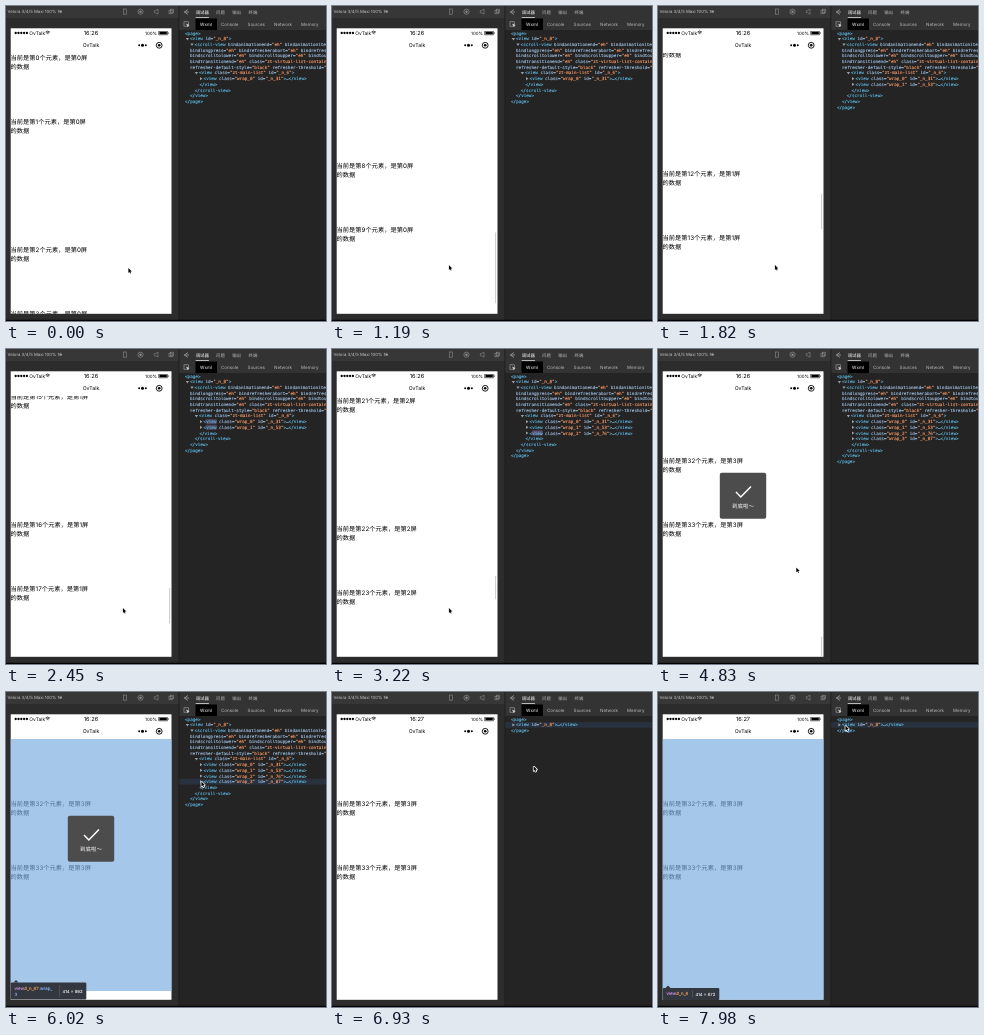
Animation of 320x315 px, one loop 8000 ms. Source, as an HTML page with a canvas:

```html
<!DOCTYPE html>
<html>
<head>
<meta charset="utf-8">
<style>
html, body { margin: 0; width: 100%; height: 100%; overflow: hidden; background: #242424; }
canvas { display: block; width: 320px; height: 315px; }
</style>
</head>
<body>
<canvas id="stage" width="320" height="315"></canvas>
<script>
const c = document.getElementById('stage').getContext('2d');
const LOOP = 8000, STEP = 70, TOP = 47, VIEW = 261;
const SANS = '"Noto Sans CJK SC", "Noto Sans CJK", "Noto Sans", sans-serif';
const MIXED = '"Inter", ' + SANS;
const UI = '"Inter", "Liberation Sans", sans-serif';
const MONO = '"DejaVu Sans Mono", monospace';
const CHAR = 2.575, ROW = 5.68;
const TAG = '#5db0d7', ATTR = '#9bbbdc', VALUE = '#f29766';
const OVERLAY = 'rgba(119,170,224,.66)', ICON = '#8c8c8c';

const scrollKeys = [[210, 0], [1190, 659.5], [2450, 1412], [3220, 1983.5], [3990, 2600.5], [4620, 3011.5]];
const cursorKeys = [
  [0, 122, 261.5], [140, 116.5, 258.5], [4690, 116.5, 258.5], [5250, 202, 96], [5600, 196, 90],
  [5810, 197, 91], [5880, 188, 81], [5950, 188, 81], [6020, 195, 89], [6160, 195, 89],
  [6510, 182, 32], [6650, 182, 32], [7000, 206, 84], [7420, 199, 82], [7490, 199, 82], [7840, 187, 33]
];
const wraps = [[0, 31], [1400, 53], [2870, 76], [4130, 87]];
const flashes = [[1400, 1700, 1], [2240, 2660, 0], [2240, 2660, 1], [3080, 3500, 2], [3850, 4130, 1], [4130, 4550, 3]];
const attributes = [
  '<scroll-view bindanimationend="eh" bindanimationiteration',
  'bindlongpress="eh" bindrefresherabort="eh" bindrefresher',
  'bindscrolltolower="eh" bindscrolltoupper="eh" bindtouch',
  'bindtransitionend="eh" class="zt-virtual-list-container"',
  'refresher-default-style="black" refresher-threshold="45"'
];

function at(keys, t) {
  const n = keys.findIndex(k => k[0] > t);
  if (n === 0) return keys[0].slice(1);
  if (n < 0) return keys[keys.length - 1].slice(1);
  const a = keys[n - 1], b = keys[n], f = (t - a[0]) / (b[0] - a[0]);
  return a.slice(1).map((v, i) => v + (b[i + 1] - v) * f);
}

function rect(x, y, w, h, color) {
  c.fillStyle = color;
  c.fillRect(x, y, w, h);
}

function round(x, y, w, h, r, color) {
  c.fillStyle = color;
  c.beginPath();
  c.roundRect(x, y, w, h, r);
  c.fill();
}

function dot(x, y, r, color) {
  c.fillStyle = color;
  c.beginPath();
  c.arc(x, y, r, 0, 7);
  c.fill();
}

function ring(x, y, r, color, width) {
  c.strokeStyle = color;
  c.lineWidth = width;
  c.beginPath();
  c.arc(x, y, r, 0, 7);
  c.stroke();
}

function line(points, color, width) {
  c.strokeStyle = color;
  c.lineWidth = width;
  c.beginPath();
  points.forEach(p => c.lineTo(...p));
  c.stroke();
}

function shape(points, color) {
  c.fillStyle = color;
  c.beginPath();
  points.forEach(p => c.lineTo(...p));
  c.fill();
}

// Set large and scaled down, so small type keeps its true advances.
// Returns the width; weight thickens the strokes.
function text(s, x, y, size, color, font = UI, align = 'left', weight = 0) {
  c.save();
  c.translate(x, y);
  c.scale(.1, .1);
  c.font = size * 10 + 'px ' + font;
  c.textRendering = 'geometricPrecision';
  c.textAlign = align;
  c.textBaseline = 'alphabetic';
  c.fillStyle = c.strokeStyle = color;
  c.lineWidth = weight * 10;
  c.fillText(s, 0, size * 3.6);
  if (weight) c.strokeText(s, 0, size * 3.6);
  const { width } = c.measureText(s);
  c.restore();
  return width / 10;
}

function code(s, x, y) {
  for (const m of s.matchAll(/"[^"]*"?|<\/?[\w-]+|[>…]|[\w-]+|=/g)) {
    const color = m[0][0] === '"' ? VALUE : /[<>]/.test(m[0]) ? TAG : ATTR;
    text(m[0], x + m.index * CHAR, y, CHAR / .602, color, MONO, 'left', .15);
  }
}

function arrow(x, y, open) {
  shape(open ? [[x - 1.6, y - 1], [x + 1.6, y - 1], [x, y + 1.5]]
             : [[x - 1, y - 1.6], [x - 1, y + 1.6], [x + 1.4, y]], '#a0a0a0');
}

function toolbar() {
  rect(0, 0, 173, 315, '#2c2c2c');
  rect(0, 0, 173, 12, '#373737');
  text('Velora 3/4/5 Maxi 100% 16', 1.5, 5.5, 4.3, '#c8c8c8');
  shape([[53.5, 5], [56, 5], [54.75, 6.6]], '#aaa');
  c.strokeStyle = ICON;
  c.lineWidth = .6;
  c.strokeRect(117.4, 3, 3.2, 5.2);
  ring(134.5, 5.7, 2.6, ICON, .7);
  dot(134.5, 5.7, 1.2, ICON);
  line([[152, 3.2], [149.6, 4.6], [148.3, 4.6], [148.3, 6.8], [149.6, 6.8], [152, 8.2], [152, 3.2]], ICON, .6);
  c.strokeRect(163, 4.2, 3.2, 3.6);
  c.strokeRect(164.6, 3.2, 3, 3.6);
}

function phoneBar(t) {
  for (let i = 0; i < 5; i++) dot(9.7 + i * 2.8, 27, 1.15, '#000');
  text('OvTalk', 23.3, 27, 4.9, '#000');
  for (const r of [1, 2.2, 3.4]) {
    c.strokeStyle = '#000';
    c.lineWidth = .7;
    c.beginPath();
    c.arc(41.7, 28.6, r, -2.3, -.84);
    c.stroke();
  }
  text(t < 6720 ? '16:26' : '16:27', 85, 27, 5.7, '#000', UI, 'center');
  text('100%', 151, 27, 4.5, '#000', UI, 'right');
  c.strokeStyle = '#000';
  c.lineWidth = .5;
  c.strokeRect(152.8, 25.3, 8.6, 3.6);
  rect(153.4, 25.9, 7.4, 2.4, '#000');
  rect(161.8, 26.3, .7, 1.6, '#000');
  text('OvTalk', 85, 39.4, 5.2, '#000', UI, 'center');
  dot(133.2, 39.3, 1, '#000');
  dot(136.5, 39.3, 1.5, '#000');
  dot(139.8, 39.3, 1, '#000');
  ring(153.2, 39.3, 2.9, '#000', .9);
  dot(153.2, 39.3, 1.3, '#000');
}

function list(t) {
  const [scroll] = at(scrollKeys, t);
  for (let i = 0; i < 34; i++) {
    const y = TOP + 4.6 + i * 96 - (i % 2) * 32 - scroll;
    if (y < TOP - 16 || y > TOP + VIEW + 8) continue;
    text(`当前是第${i}个元素，是第${Math.floor(i / 10)}屏`, 4.6, y, 6.25, '#000', MIXED);
    text('的数据', 4.6, y + 8.7, 6.25, '#000', MIXED);
  }
  if (t >= 280 && t < 5250) {
    const height = scroll < 680 ? 960 : scroll < 1640 ? 1920 : scroll < 2600 ? 2880 : 3264;
    round(163.2, TOP + scroll / height * VIEW, .9, VIEW * VIEW / height, .45, '#c4c4c4');
  }
}

function toast() {
  round(61.8, 123.8, 46.4, 46, 2, '#4c4c4c');
  line([[78, 143], [82.8, 148], [93, 137.5]], '#fff', 1.5);
  text('到底啦～', 85, 157.3, 5.5, '#fff', SANS, 'center');
}

function tip(rows, size, width, y, height, split) {
  shape([[7.5, y], [10, y - 2.4], [12.5, y]], '#333740');
  round(4.8, y, width, height, 1, '#333740');
  rows.forEach((parts, i) => {
    let x = 8.5;
    for (const [s, color] of parts) x += text(s, x, y + 5.8 + i * 5.8, 4.4, color, UI, 'left', .12);
  });
  rect(split, y + 2.5, .4, height - 5, '#777');
  text(size, split + 3, y + height / 2, 4.2, '#e8e8e8', UI, 'left', .12);
}

const hoverLast = t => t >= 6020 && t < 6370;
const hoverRoot = t => t >= 6370 && t < 6790 || t >= 7700;

function phone(t) {
  rect(4.7, 22.3, 160.8, 285.5, '#fff');
  phoneBar(t);
  c.save();
  c.beginPath();
  c.rect(4.7, TOP, 160.8, VIEW - .2);
  c.clip();
  list(t);
  if (hoverLast(t)) rect(4, TOP, 162, 252, OVERLAY);
  if (hoverRoot(t)) rect(4, TOP, 162, VIEW, OVERLAY);
  c.restore();
  if (t >= 4690 && t < 6650) toast();
  const name = 'view', pink = '#d48fe0', orange = '#f0a35e', blue = '#8ab4f8';
  if (hoverLast(t)) tip([[[name, pink], ['#_n_87', orange], ['.wrap_', blue]], [['3', blue]]],
    '414 × 992', 75.5, 290.5, 17, 53.5);
  if (hoverRoot(t)) tip([[[name, pink], ['#_n_8', orange]]], '414 × 672', 56.5, 296, 12, 34.5);
}

function inspectorBar() {
  rect(173, 0, 147, 315, '#242424');
  rect(173, 0, 147, 24, '#333');
  rect(172.5, 0, .8, 315, '#1c1c1c');
  line([[182, 3.5], [178.3, 6], [182, 8.5]], '#aaa', .7);
  line([[178.3, 6], [183, 6]], '#aaa', .7);
  ['调试器', '问题', '输出', '终端'].forEach((s, i) =>
    text(s, [189.7, 210, 226.3, 242.5][i], 6.2, 4.4, i ? '#b8b8b8' : '#fff', SANS));
  rect(189.7, 11, 13.2, .8, '#ddd');
  c.strokeStyle = '#aaa';
  c.lineWidth = .6;
  c.strokeRect(178, 15.8, 4.4, 4.4);
  shape([[180, 17.6], [183.5, 19], [181.6, 21]], '#ccc');
  rect(189.5, 12.5, 21.5, 11.5, '#000');
  ['Wxml', 'Console', 'Sources', 'Network', 'Memory'].forEach((s, i) =>
    text(s, [194, 215, 241.5, 268, 295][i], 18, 4.5, i ? '#bbb' : '#fff'));
}

function tree(t) {
  let y = 27.2;
  const row = (s, x, open) => {
    if (open !== undefined) arrow(x - 2.6, y, open);
    code(s, x, y);
    y += ROW;
  };
  const select = () => rect(173.3, y - 2.8, 146.7, 5.6, '#28323f');
  row('<page>', 179);
  if (t >= 6650) {
    select();
    row('<view id="_n_8">…</view>', 184, false);
  } else {
    row('<view id="_n_8">', 184, true);
    attributes.forEach((s, i) => i ? row(s, 184) : row(s, 188.6, true));
    row('<view class="zt-main-list" id="_n_6">', 193, true);
    wraps.forEach(([start, id], i) => {
      if (t < start) return;
      if (i === 3 && hoverLast(t)) select();
      for (const [a, b, n] of flashes) {
        if (n === i && t >= a && t < b) {
          rect(200.2, y - 2.5, 10.4, 5, `rgba(150,125,190,${.75 * (b - t) / (b - a)})`);
        }
      }
      row(`<view class="wrap_${i}" id="_n_${id}">…</view>`, 197.6, false);
    });
    row('</view>', 193.4);
    row('</scroll-view>', 188.8);
    row('</view>', 184);
  }
  row('</page>', 179);
}

function pointer(t) {
  const [x, y] = at(cursorKeys, t);
  const outline = [[0, 0], [0, 6], [1.4, 4.8], [2.3, 6.9], [3.3, 6.5], [2.4, 4.4], [4.3, 4.3], [0, 0]]
    .map(p => [p[0] * .8 + x + .4, p[1] * .8 + y + .6]);
  c.lineJoin = 'round';
  line(outline, '#fff', 1.5);
  c.lineJoin = 'miter';
  shape(outline, '#000');
}

function draw(now) {
  const t = Math.floor(now % LOOP / STEP) * STEP;
  toolbar();
  phone(t);
  inspectorBar();
  tree(t);
  rect(0, 313.8, 320, 1.2, '#000');
  pointer(t);
}

const start = performance.now();
function loop() {
  draw(performance.now() - start);
  requestAnimationFrame(loop);
}
loop();
</script>
</body>
</html>
```
